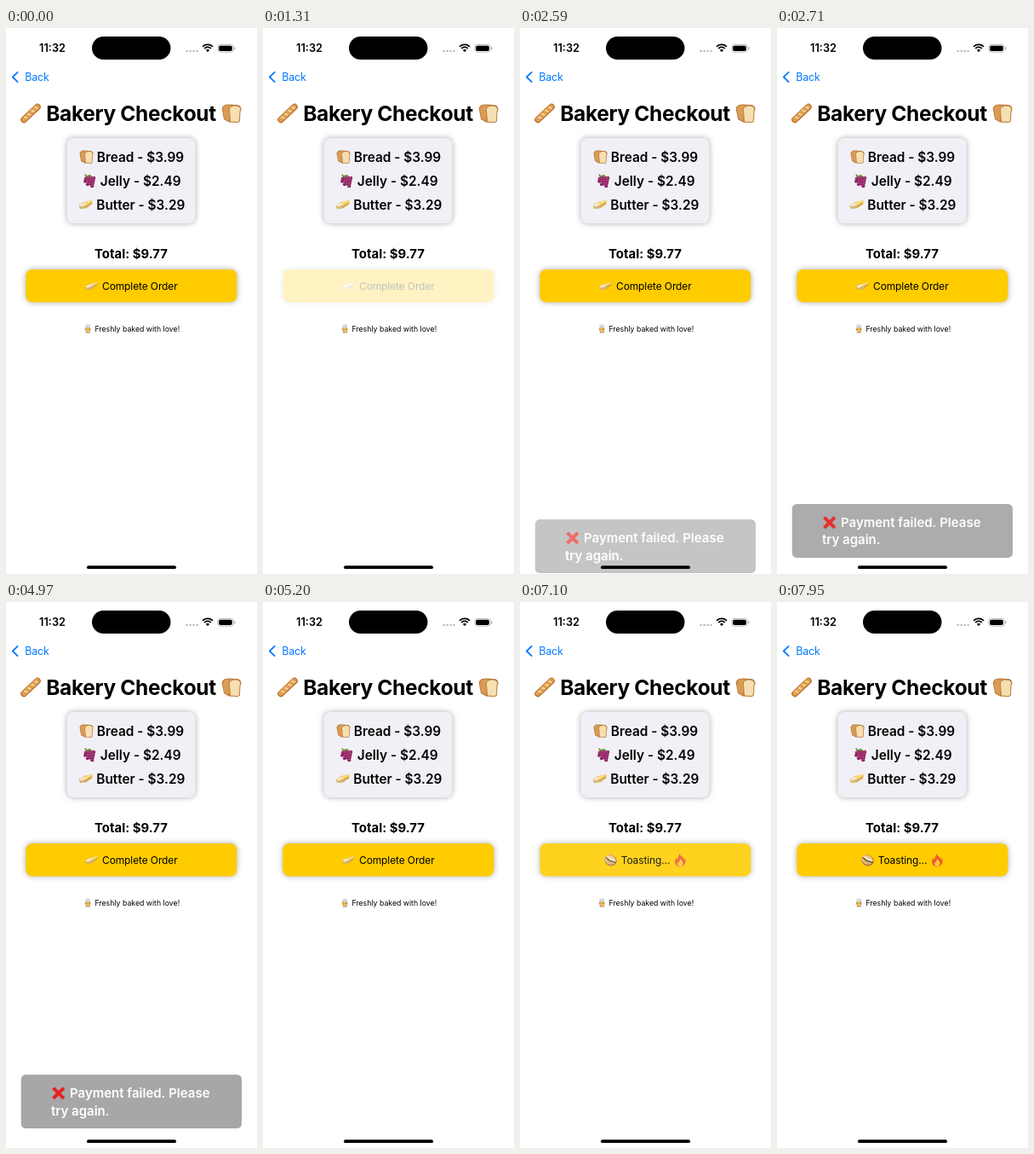
An HTML page with a canvas that plays this animation: 295 by 640 pixels, repeating every 8000 ms.

```html
<!DOCTYPE html>
<html lang="en">
<head>
<meta charset="utf-8">
<title>Bakery Checkout</title>
<style>
html, body { margin: 0; width: 100%; height: 100%; overflow: hidden; background: #fff; }
canvas { display: block; width: 295px; height: 640px; }
</style>
</head>
<body>
<canvas id="stage"></canvas>
<script>
const W = 295, H = 640, LOOP = 8000;
const scale = Math.max(1, window.devicePixelRatio || 1);
const stage = document.getElementById('stage');
const layer = document.createElement('canvas');
for (const c of [stage, layer]) {
  c.width = W * scale;
  c.height = H * scale;
  c.getContext('2d').scale(scale, scale);
}
const screen = stage.getContext('2d');
const overlay = layer.getContext('2d');
let g = screen;

// Draws a group on its own layer, then blends it as one picture.
function fade(alpha, draw) {
  overlay.clearRect(0, 0, W, H);
  g = overlay;
  draw();
  g = screen;
  g.globalAlpha = alpha;
  g.drawImage(layer, 0, 0, W, H);
  g.globalAlpha = 1;
}

function box(x, y, w, h, r, fill, shadow) {
  g.save();
  if (shadow) {
    g.shadowColor = 'rgba(0,0,0,.33)';
    g.shadowBlur = 7.5 * scale;
  }
  g.fillStyle = fill;
  g.beginPath();
  g.roundRect(x, y, w, h, r);
  g.fill();
  g.restore();
}

function text(str, x, y, size, weight, fill = '#000', align = 'left', spacing = 0) {
  g.font = `${weight} ${size}px Inter, "Liberation Sans", sans-serif`;
  g.letterSpacing = spacing + 'px';
  g.textAlign = align;
  g.fillStyle = fill;
  g.fillText(str, x, y);
}

function line(points, width, color, cap = 'round') {
  g.lineWidth = width;
  g.strokeStyle = color;
  g.lineCap = cap;
  g.lineJoin = 'round';
  g.beginPath();
  points.forEach(([x, y]) => g.lineTo(x, y));
  g.stroke();
}

function oval(x, y, rx, ry, fill, turn = 0) {
  g.fillStyle = fill;
  g.beginPath();
  g.ellipse(x, y, rx, ry, turn, 0, Math.PI * 2);
  g.fill();
}

function shape(d, fill) {
  g.fillStyle = fill;
  g.fill(new Path2D(d));
}

// Icons live in a 24 x 24 box.
const icons = {
  baguette() {
    line([[4, 19.5], [20, 4.5]], 7.6, '#b96f2b');
    line([[4.2, 19], [19.6, 4.5]], 5.8, '#e0a052');
    for (let i = 0; i < 4; i++) {
      const x = 5 + i * 4.1, y = 16.6 - i * 3.9;
      line([[x, y], [x + 2.6, y + 1]], 1.6, '#f8dfab');
    }
  },
  bread() {
    shape('M1 8C0 4 4 1 9 1.5L18 2C23 2 25 7 22.5 10L22 21C21.5 22.5 20 23 18 23L9 22.5L3 19Z', '#b9793c');
    shape('M2 8C1.5 4 5 2 9 2.5L14 3C10 4 8 7 9.5 10L9.5 21.5L3.5 18Z', '#d99b55');
    shape('M10 9C9 5 13 3.5 16.5 3.5C21.5 3.5 23.5 7 21.5 9.5L21 20.5C20.5 21.8 19.5 22 18 22L11 21.5Z', '#f6dfb1');
  },
  grapes() {
    line([[5, 2], [8, 6]], 1.8, '#7b5a32');
    shape('M7 6C8 1 14 1 16 4C14 7 10 8 7 6Z', '#5fa23c');
    for (let row = 0; row < 4; row++) {
      for (let i = 0; i < 4 - row; i++) {
        const x = 6 + i * 4.4 + row * 3.5, y = 8.5 + row * 4.1 - i * 0.3;
        oval(x, y, 3, 3, '#7d1d55');
        oval(x - 0.5, y - 0.6, 2, 2, '#ae3d7c');
      }
    }
    oval(5, 13, 2.8, 2.8, '#8d2561');
    oval(9, 18, 2.8, 2.8, '#8d2561');
  },
  butter() {
    shape('M1 13L9 8L23 5L23 11L13 18L3 19Z', '#d9a83a');
    shape('M1 13L10 8.5L14 12L5 16Z', '#f4ead2');
    shape('M10 8.5L22.5 5L22 8L13 12.5Z', '#fbdf78');
    line([[4, 17.5], [13, 15.5], [15, 12]], 1.4, '#c9c3b4');
  },
  wrap() {
    oval(12, 12.5, 11, 9.5, '#a9703a', 0.45);
    oval(11.3, 11.5, 10, 8, '#ecc98c', 0.45);
    line([[4, 8], [10, 13], [20, 16]], 2.4, '#6d5a3c');
    line([[7, 6.5], [13, 10.5], [20, 13]], 2, '#fbf0d5');
    line([[5, 13], [11, 17.5], [16, 18.5]], 1.6, '#d19a56');
  },
  fire() {
    shape('M10 0C12 5 18 7 19 12C20 11 20 9 19.5 7.5C24 13 22 24 12 24C2 24 0 14 5.5 8C5.5 10 6 11 7.5 12C7 7 11 5 10 0Z', '#ef5a2b');
    shape('M12 9C13 13 17.5 14 17 18.5C16.5 22 14 23.5 12 23.5C8 23.5 6 20 7.5 16C8 17 9 17.5 10 17.5C9.5 14 12.5 13 12 9Z', '#ffc83d');
  },
  chef() {
    shape('M3 24C3 18 21 18 21 24Z', '#e3e5ea');
    oval(12, 13, 6.8, 7, '#8b5a2b');
    oval(12, 14, 5.3, 6, '#f7c948');
    shape('M6 9L5 5C4 1 8 0 12 0C16 0 20 1 19 5L18 9Z', '#d5d8df');
    line([[9.5, 13.5], [9.6, 13.5]], 1.6, '#4d3a20');
    line([[14.4, 13.5], [14.5, 13.5]], 1.6, '#4d3a20');
    line([[7, 21], [17, 21]], 1.6, '#d9534a');
  },
  cross() {
    line([[3.5, 3.5], [20.5, 20.5]], 5.4, '#e8201c', 'butt');
    line([[20.5, 3.5], [3.5, 20.5]], 5.4, '#e8201c', 'butt');
  }
};

function icon(name, x, y, size) {
  g.save();
  g.translate(x, y);
  g.scale(size / 24, size / 24);
  icons[name]();
  g.restore();
}

function statusBar() {
  text('11:32', 54.5, 28, 12.7, 600, '#000', 'center');
  box(101, 10, 92.5, 27, 13.5, '#000');
  for (let i = 0; i < 4; i++) oval(212.6 + i * 4, 27, 1.3, 1.3, '#bdbdbd');
  g.lineCap = 'butt';
  g.strokeStyle = '#000';
  g.lineWidth = 1.8;
  for (const r of [8.2, 5.2]) {
    g.beginPath();
    g.arc(237, 27.6, r, -Math.PI * 0.76, -Math.PI * 0.24);
    g.stroke();
  }
  shape('M237 28.2L234.8 25.8Q237 24 239.2 25.8Z', '#000');
  g.strokeStyle = '#a6a6a6';
  g.lineWidth = 0.8;
  g.beginPath();
  g.roundRect(248.9, 19.4, 18.4, 8.8, 2.8);
  g.stroke();
  box(250.2, 20.7, 15.6, 6.2, 1.7, '#000');
  box(268.3, 22.3, 1.1, 3.2, 0.6, '#a6a6a6');
}

function page() {
  g.fillStyle = '#fff';
  g.fillRect(0, 0, W, H);
  statusBar();
  line([[13.6, 51.8], [7.8, 57.5], [13.6, 63.2]], 1.8, '#007aff');
  text('Back', 22.2, 62, 12.4, 400, '#007aff', 'left', -0.1);

  icon('baguette', 17, 88, 24);
  text('Bakery Checkout', 147, 109, 24.5, 700, '#000', 'center', -0.35);
  icon('bread', 253, 88, 24);

  box(71.5, 129, 151, 100, 8, '#f1f0f6', true);
  const rows = [
    ['bread', 86, 'Bread - $3.99', 158],
    ['grapes', 89.5, 'Jelly - $2.49', 158.2],
    ['butter', 85, 'Butter - $3.29', 158.3]
  ];
  rows.forEach(([name, x, label, mid], i) => {
    icon(name, x, 142.5 + i * 28, 17);
    text(label, mid, 156.6 + i * 28, 15.4, 600, '#000', 'center');
  });

  text('Total: $9.77', 147, 270, 14.9, 700, '#000', 'center');
  icon('chef', 91, 347.5, 10.5);
  text('Freshly baked with love!', 154.3, 356, 8.75, 400, '#000', 'center');
}

function button(busy) {
  box(23.3, 283, 248, 38.4, 7.5, '#ffcc00', true);
  const label = (str, x) => text(str, x, 306.8, 12, 400, '#000', 'center', -0.12);
  if (busy) {
    icon('wrap', 98.5, 294.5, 16);
    label('Toasting...', 147.5);
    icon('fire', 180.5, 294.5, 15.5);
  } else {
    icon('butter', 92.5, 294.5, 15.5);
    label('Complete Order', 157.3);
  }
}

function toast(y) {
  box(17.7, y, 259.3, 63, 5.5, '#a7a7a9');
  icon('cross', 53, y + 13, 17.5);
  text('Payment failed. Please', 75, y + 27, 15, 600, '#fff');
  text('try again.', 53, y + 47.5, 15, 600, '#fff');
}

// A tap dims the button at once; it comes back in five steps.
const taps = [
  { at: 1310, span: 580, end: 2470 },
  { at: 6760, span: 570, end: LOOP }
];

function buttonState(t) {
  const tap = taps.find(p => t >= p.at && t < p.end);
  if (!tap) return { busy: false, alpha: 1 };
  const step = Math.min(5, Math.floor((t - tap.at + 6) / tap.span * 5));
  return { busy: step > 0, alpha: 1 - 0.77 * (1 - step / 5) ** 2 };
}

// Start time and share of the slide that is done.
const slide = [[0, 0], [2470, 0.15], [2590, 0.65], [2710, 0.937], [4970, 1], [5090, 0.68], [5200, 0]];

function render(t) {
  page();
  const { busy, alpha } = buttonState(t);
  fade(alpha, () => button(busy));
  const shown = slide.filter(([at]) => t >= at).pop()[1];
  if (shown) fade(shown, () => toast(554 + 63 * (1 - shown)));
  box(95, 630.3, 105, 3.8, 1.9, '#000');
}

const start = performance.now();
function tick() {
  render((performance.now() - start) % LOOP);
  requestAnimationFrame(tick);
}
tick();
</script>
</body>
</html>
```
